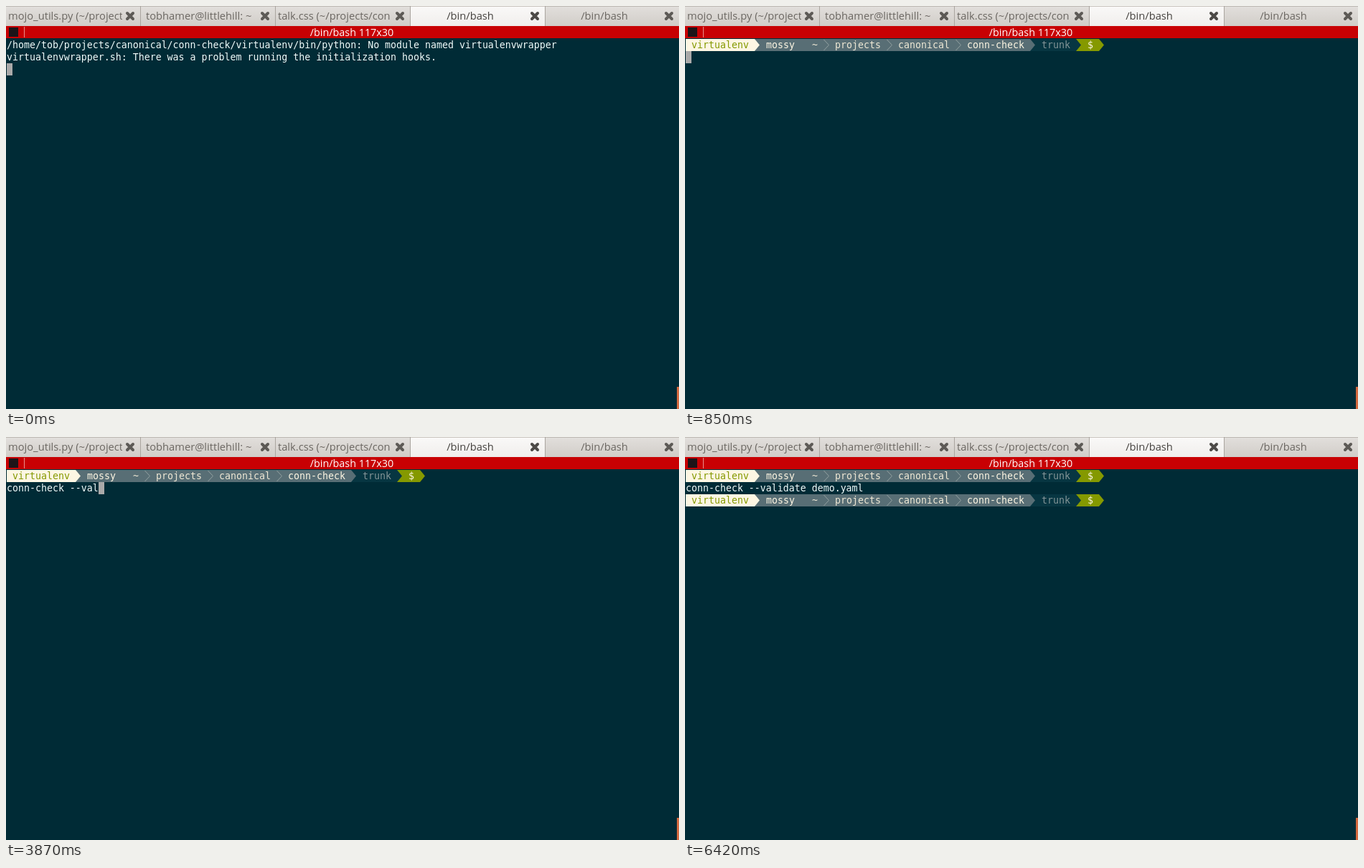
An HTML page for the animation above (8000 ms loop, 938 by 563 pixels).

```html
<!DOCTYPE html>
<html lang="en">
<head>
<meta charset="utf-8">
<title>Terminal session</title>
<style>
html, body { margin: 0; width: 100%; height: 100%; overflow: hidden; background: #002b36; }
svg { display: block; }
text { white-space: pre; }
.mono { font: 13.288px "DejaVu Sans Mono", monospace; fill: #f2fbfa; }
.ui { font: 14.7px "Open Sans", "Noto Sans", sans-serif; fill: #6b6762; }
</style>
</head>
<body>
<svg id="stage" width="938" height="563" viewBox="0 0 938 563">
  <defs>
    <linearGradient id="idle" x2="0" y2="1"><stop stop-color="#e2dfdc"/><stop offset="1" stop-color="#d1cdc8"/></linearGradient>
    <linearGradient id="active" x2="0" y2="1"><stop stop-color="#faf9f8"/><stop offset="1" stop-color="#f0eeec"/></linearGradient>
  </defs>
</svg>
<script>
const CELL = 8, LINE = 17, LEFT = 1, TOP = 46, LOOP = 8000;
const stage = document.getElementById('stage');

function add(parent, tag, attrs, content = '') {
  const el = document.createElementNS('http://www.w3.org/2000/svg', tag);
  for (const key in attrs) el.setAttribute(key, attrs[key]);
  el.textContent = content;
  return parent.appendChild(el);
}
const rect = (parent, x, y, width, height, fill) => add(parent, 'rect', { x, y, width, height, fill });
const colX = col => LEFT + col * CELL;
const rowY = row => TOP + row * LINE;
const print = (parent, row, col, str, color = '') =>
  add(parent, 'text', { class: 'mono', x: colX(col), y: rowY(row) + 13, style: color && `fill:${color}` }, str);

// Tab bar
function tab(i, label, x, anchor = 'start') {
  const left = i * 188, on = i === 3;
  rect(stage, left, 0, 187, 28, on ? 'url(#active)' : 'url(#idle)');
  rect(stage, left, 0, 187, 1, on ? '#c9c4be' : '#bdb8b2');
  rect(stage, left + 187, 0, 1, 28, '#aaa59f');
  const box = add(stage, 'svg', { x: left, y: 0, width: 162, height: 28 });
  add(box, 'text', { class: 'ui', x: x - left, y: 19, 'text-anchor': anchor, style: on ? 'fill:#45423f' : '' }, label);
  const cx = i === 4 ? 924 : left + 173;
  add(stage, 'path', {
    d: `M${cx - 4} 10l8 8m0-8l-8 8`, stroke: on ? '#4d4a47' : '#5d5a56', 'stroke-width': 4, 'stroke-linecap': 'round'
  });
}
tab(0, 'mojo_utils.py (~/project', 3);
tab(1, 'tobhamer@littlehill: ~', 195);
tab(2, 'talk.css (~/projects/con', 379);
tab(3, '/bin/bash', 647, 'middle');
tab(4, '/bin/bash', 834, 'middle');

// Title bar and scroll thumb
rect(stage, 0, 28, 938, 17, '#c80003');
rect(stage, 4, 30, 13, 13, '#1d1418');
rect(stage, 25, 29, 1, 15, '#e8908c');
add(stage, 'text', { class: 'ui', x: 482, y: 42, 'text-anchor': 'middle', style: 'fill:#fff;font-size:14.35px' }, '/bin/bash 117x30');
rect(stage, 935, 532, 3, 31, '#d4693f');

// Shell prompt made of arrow-ended segments
function prompt(row) {
  const g = add(stage, 'g', {}), y = rowY(row);
  const segment = (from, to, fill) => add(g, 'path', {
    d: `M${colX(from)} ${y}H${colX(to)}l7 8.5l-7 8.5H${colX(from)}z`, fill
  });
  segment(68, 72, '#859900');
  segment(60, 68, '#073642');
  segment(12, 60, '#586e75');
  segment(0, 12, '#fdf6e3');
  for (const col of [24, 35, 47]) add(g, 'path', {
    d: `M${colX(col) + .5} ${y + 1}l7 7.5l-7 7.5`, fill: 'none', stroke: '#93a1a1'
  });
  print(g, row, 1, 'virtualenv', '#859900');
  print(g, row, 14, 'mossy', '#fdf6e3');
  print(g, row, 22, '~', '#eee8d5');
  print(g, row, 26, 'projects', '#eee8d5');
  print(g, row, 37, 'canonical', '#eee8d5');
  print(g, row, 49, 'conn-check', '#fdf6e3');
  print(g, row, 62, 'trunk', '#839496');
  print(g, row, 70, '$', '#fdf6e3');
  return g;
}

const warning = [
  '/home/tob/projects/canonical/conn-check/virtualenv/bin/python: No module named virtualenvwrapper',
  'virtualenvwrapper.sh: There was a problem running the initialization hooks.',
  '',
  'If Python could not import the module virtualenvwrapper.hook_loader,',
  'check that virtualenvwrapper has been installed for',
  'VIRTUALENVWRAPPER_PYTHON=/home/tob/projects/canonical/conn-check/virtualenv/bin/python and that PATH is',
  'set properly.'
].map((line, row) => print(stage, row, 0, line));
const command = 'conn-check --validate demo.yaml';
const typed = print(stage, 1, 0, '');
const prompts = [7, 0, 2].map(prompt);
const cursor = rect(stage, 0, 0, CELL, LINE, '#aaa');

// Key presses: [time, characters on the line]
const keys = [
  [1470, 1], [1540, 2], [1700, 3], [1810, 4], [2080, 5], [2190, 6], [2300, 7], [2400, 8],
  [2540, 9], [2640, 10], [3360, 12], [3480, 13], [3640, 14], [3800, 15], [3870, 16],
  [4000, 17], [4060, 18], [4200, 19], [4540, 20], [4710, 21], [4820, 22],
  [5110, 23], [5220, 24], [5320, 25], [5430, 31]
];
const show = (el, on) => el.setAttribute('visibility', on ? 'visible' : 'hidden');

function draw() {
  const t = performance.now() % LOOP, cleared = t >= 850;
  warning.forEach((line, i) => show(line, !cleared && (i < 2 || t >= 100)));
  show(prompts[0], t >= 500 && !cleared);
  show(prompts[1], cleared);
  show(prompts[2], t >= 6420);

  const count = keys.reduce((n, [time, chars]) => t >= time ? chars : n, 0);
  typed.textContent = command.slice(0, count);
  const row = cleared ? 1 : t >= 500 ? 8 : t >= 100 ? 7 : 2;
  cursor.setAttribute('x', colX(count));
  cursor.setAttribute('y', rowY(row));
  show(cursor, t < 2400 || (t >= 3800 && t < 5430));
  requestAnimationFrame(draw);
}
draw();
</script>
</body>
</html>
```
